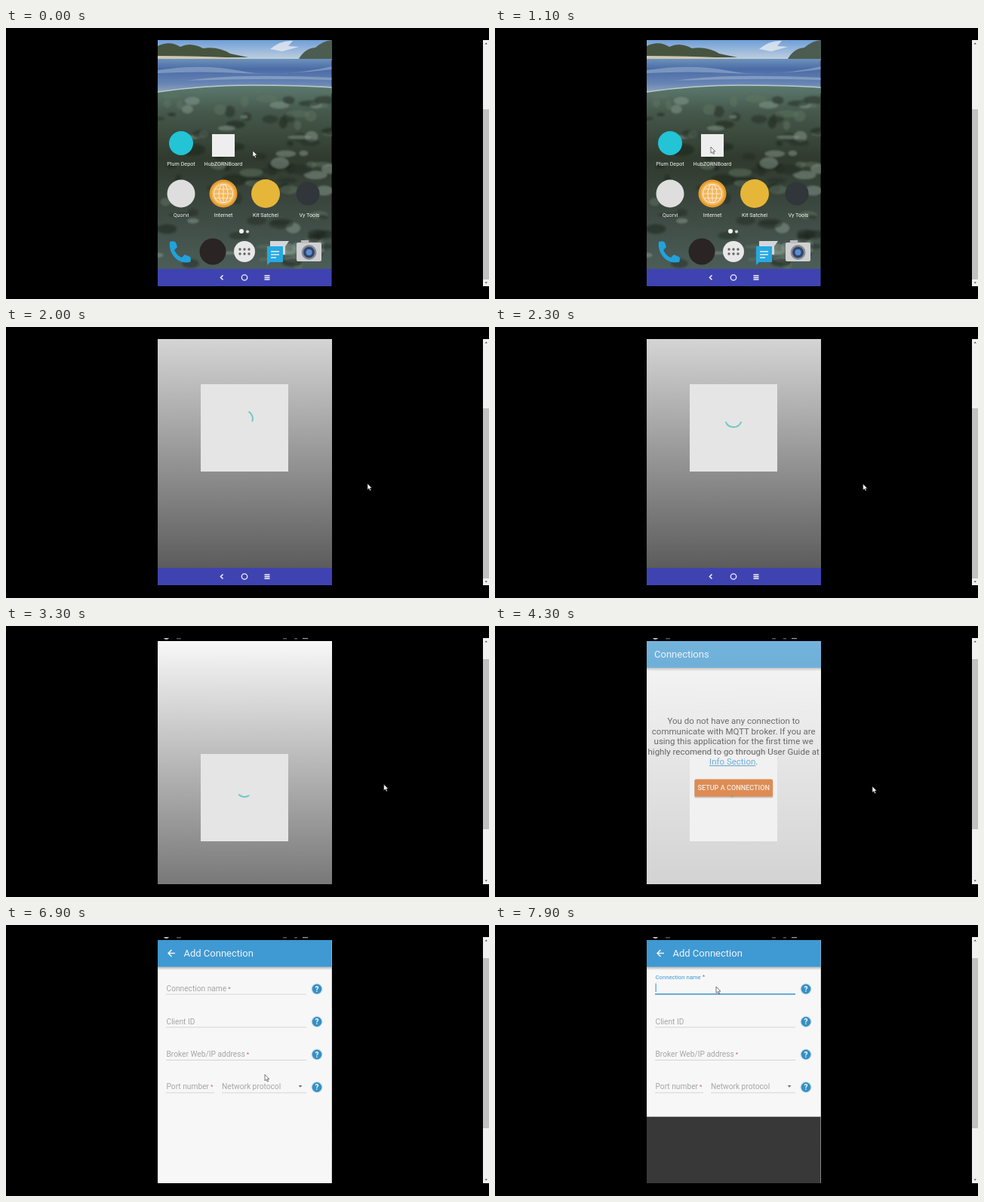
Write an HTML page that moves like this. It is 640x360 px and loops after 8 s.

```html
<!DOCTYPE html>
<html lang="en">
<head>
<meta charset="utf-8">
<title>Phone app setup</title>
<style>
  html, body { margin: 0; width: 100%; height: 100%; overflow: hidden; background: #000; }
  svg { display: block; width: 100vw; height: 100vh; font-family: Roboto, sans-serif; }
  .mid { text-anchor: middle; }
  .tag { font-size: 7.2px; fill: #f2f2f2; }
  .title { font-size: 13px; fill: #eef4f8; }
  .body { font-size: 11.5px; fill: #444; }
  .field { font-size: 10.2px; fill: #a6a6a6; }
  .star { font-size: 8px; fill: #b8686c; }
</style>
</head>
<body>
<svg id="stage" viewBox="0 0 640 360">
  <defs>
    <clipPath id="view"><rect x="201" y="16" width="230.5" height="327"/></clipPath>
    <clipPath id="reefClip"><rect x="201" y="86" width="231" height="234"/></clipPath>
    <linearGradient id="sky" x2="0" y2="1">
      <stop stop-color="#6f9fd8"/><stop offset="1" stop-color="#c4d2de"/>
    </linearGradient>
    <linearGradient id="sea" x2="0" y2="1">
      <stop stop-color="#6d92bc"/><stop offset=".3" stop-color="#4a6ba6"/>
      <stop offset=".7" stop-color="#6684b4"/><stop offset="1" stop-color="#94a9bc"/>
    </linearGradient>
    <linearGradient id="reef" x2="0" y2="1">
      <stop stop-color="#5c7a70"/><stop offset=".14" stop-color="#46594c"/>
      <stop offset=".4" stop-color="#303a2e"/><stop offset=".7" stop-color="#3d4a42"/>
      <stop offset="1" stop-color="#4c5d58"/>
    </linearGradient>
    <linearGradient id="dusk" x2="0" y2="1">
      <stop stop-color="#f8f8f8"/><stop offset="1" stop-color="#5c5c5c"/>
    </linearGradient>
    <linearGradient id="drop" x2="0" y2="1">
      <stop stop-color="#555" stop-opacity=".45"/><stop offset="1" stop-color="#555" stop-opacity="0"/>
    </linearGradient>
    <filter id="soft"><feGaussianBlur stdDeviation="1"/></filter>
  </defs>
  <rect width="640" height="360"/>

  <g clip-path="url(#view)">
    <g id="world">
      <g id="home"></g>
      <g id="splash">
        <rect x="201" y="-74" width="231" height="394" fill="url(#dusk)"/>
        <rect x="258" y="76" width="116" height="116" fill="#e5e5e5"/>
        <path id="spin" fill="none" stroke="#70c8c4" stroke-width="2"/>
      </g>
      <g fill="none" stroke="#f2f2f2" stroke-width="1.6">
        <rect x="201" y="320" width="231" height="23" fill="#3f43b2" stroke="none"/>
        <path d="M287.5 328.5l-3 3 3 3M342.5 329h7m-7 2.6h7m-7 2.6h7"/>
        <circle cx="316" cy="331.5" r="3.7" stroke-width="1.3"/>
      </g>
    </g>
    <g id="list"></g>
    <g id="form"></g>
    <g id="status">
      <rect x="201" y="16" width="231" height="4"/>
      <path d="M209 16h7q-1 2-3.500 2t-3.500-2z" fill="#c4c4c4"/>
      <path d="M226 16h6v1.500h-6zM367 16h5v1.500h-5zM382 16h4v1.500h-4z" fill="#555"/>
      <path d="M393 16h7v1.200h-7z" fill="#a0a0a0"/>
    </g>
  </g>

  <rect x="632" y="16" width="8" height="327" fill="#f1f1f1"/>
  <rect id="thumb" x="632" width="8" height="226" fill="#c1c1c1"/>
  <path d="M634.5 21.5l1.700-2 1.700 2zM634.500 337.500l1.700 2 1.700-2z" fill="#505050"/>
  <path id="cursor" d="M0 0v8.200l1.900-1.700 1.300 2.900 1.400-.6-1.300-2.800h2.500z" fill="#fff" stroke="#222" stroke-width=".6"/>
</svg>

<script>
const $ = id => document.getElementById(id);
const text = (x, y, s, cls, extra = "") => `<text x="${x}" y="${y}" class="${cls}" ${extra}>${s}</text>`;
const disc = (x, y, r, fill) => `<circle cx="${x}" cy="${y}" r="${r}" fill="${fill}"/>`;
const rect = (x, y, w, h, fill, extra = "") =>
  `<rect x="${x}" y="${y}" width="${w}" height="${h}" fill="${fill}" ${extra}/>`;
const path = (d, fill, extra = "") => `<path d="${d}" fill="${fill}" ${extra}/>`;

const PAPER = "#f7f7f7", BLUE = "#3f99d2", ORANGE = "#da6a1c";

function wallpaper() {
  let seed = 7;
  const rnd = () => (seed = seed * 16807 % 2147483647) / 2147483647;
  const tones = ["#8a9c90", "#1c241c", "#5f7460", "#252e26"];
  let blobs = "";
  for (let i = 0; i < 110; i++) {
    blobs += `<ellipse cx="${201 + rnd() * 231}" cy="${90 + rnd() * 230}" rx="${4 + rnd() * 13}"
      ry="${2 + rnd() * 6}" fill="${tones[i % 4]}" opacity=".5"/>`;
  }
  return rect(201, 16, 231, 27, "url(#sky)")
    + path("M350 28q14-12 30-11l-6 7 14 1-22 6z", "#e6ecf2", 'opacity=".8"')
    + path("M201 24q16-8 30 1 14-7 30 2 20-3 36 7l24 5H201z", "#46543f")
    + path("M201 37q60 0 130 4H201z", "#cfc6b0")
    + path("M388 41q8-14 22-15 10-9 22-10v25z", "#4d5c50")
    + rect(201, 41, 231, 46, "url(#sea)")
    + path("M201 56q60-9 110 1t121-6v4q-70 8-120 5t-111 0zM240 70q60-10 192-4v3q-100-3-192 1z", "#a8bcd6", 'opacity=".5"')
    + path("M201 85q60-9 125-9t106 3v241H201z", "url(#reef)")
    + `<g clip-path="url(#reefClip)"><g filter="url(#soft)">${blobs}</g></g>`
    + path("M201 85q60-9 125-9t106 3", "none", 'stroke="#bccbcc" stroke-width="1.5"');
}

function globe(x, y) {
  return disc(x, y, 18.5, "#e79b2c") + disc(x, y, 15.5, "#f2b65c")
    + `<g fill="none" stroke="#fae8c8" stroke-width="1.1"><circle cx="${x}" cy="${y}" r="12.5"/>
      <ellipse cx="${x}" cy="${y}" rx="6" ry="12.5"/>
      <path d="M${x} ${y - 12.5}v25M${x - 12.5} ${y}h25M${x - 11} ${y - 6}h22M${x - 11} ${y + 6}h22"/></g>`;
}

function homeScreen() {
  const tags = [[232, 183, "Plum Depot"], [288, 183, "HubZORNBoard"], [232, 250.5, "Quorvi"],
    [288, 250.5, "Internet"], [344, 250.5, "Kit Satchel"], [402, 250.5, "Vy Tools"]];
  let dots = "";
  for (let i = 0; i < 6; i++) dots += disc(310 + i % 3 * 6, 294 + (i > 2) * 6, 1.7, "#666");
  return wallpaper()
    + disc(232, 153, 16, "#22c4d6")
    + rect(273, 141, 30, 30, "#eee")
    + disc(232, 220, 18.5, "#dedede")
    + globe(288, 220)
    + disc(344, 220, 19, "#e6b638")
    + disc(400, 220, 15.5, "#30363a")
    + disc(312, 270, 3, "#f4f4f4") + disc(320, 270.5, 2, "#d4d8d8")
    + path("M217 284q6-2 8 1l2 6-4 4q4 8 10 10l4-4 7 3q2 3 0 7-17 3-25-13-3-7-2-14z", "#22a2dc")
    + disc(274, 297, 17.5, "#2a2424")
    + disc(316, 297, 14, "#e8e8e8") + dots
    + path("M350 283h25l-5 7v11h-20z", "#d2d8da")
    + path("M346 290h21v21h-17l-4 4z", "#26a8e2")
    + path("M351 297h11m-11 4h11m-11 4h7", "none", 'stroke="#e4f2fa" stroke-width="1.3"')
    + rect(385, 285, 33, 25, "#d0d0d2", 'rx="2"') + rect(391, 282, 10, 4, "#bcbcbe")
    + disc(401.5, 298, 10, "#868c94") + disc(401.5, 298, 7.5, "#344466") + disc(401.5, 298, 4, "#5a8ed8")
    + tags.map(([x, y, s]) => text(x, y, s, "tag mid")).join("");
}

const header = (x, s) => rect(201, 55, 231, 5, "url(#drop)") + rect(201, 20, 231, 35.5, BLUE)
  + text(x, 42, s, "title");

function listScreen() {
  const lines = ["You do not have any connection to", "communicate with MQTT broker. If you are",
    "using this application for the first time we", "highly recomend to go through User Guide at",
    `<tspan fill="${BLUE}" text-decoration="underline">Info Section</tspan>.`];
  return rect(201, 20, 231, 323, PAPER) + header(211, "Connections")
    + lines.map((s, i) => text(316.2, 130 + i * 13.5, s, "body mid")).join("")
    + rect(264, 205, 104.5, 23.5, "#777", 'rx="2" opacity=".45"')
    + rect(264.5, 203.5, 103.5, 23.2, ORANGE, 'rx="1.5"')
    + text(316.2, 218.4, "SETUP A CONNECTION", "mid", 'font-size="9.1" font-weight="500" fill="#fbeee4"');
}

function formScreen() {
  const star = `<tspan class="star" dx="2" dy="-1.5">*</tspan>`;
  const rule = (x, y, w) => rect(x, y, w, .8, "#ccc");
  const help = y => disc(412, y, 7.6, "#d0e0ea") + disc(412, y, 6.4, "#3590c4")
    + text(412, y + 3.5, "?", "mid", 'font-size="10" font-weight="700" fill="#f4f8fa"');
  return rect(201, 20, 231, 323, PAPER) + header(235.5, "Add Connection")
    + path("M224 37.5h-9m4.5-4.5l-4.5 4.5 4.5 4.5", "none", 'stroke="#eef4f8" stroke-width="1.5"')
    + `<text id="label" x="212.5">Connection name${star}</text>`
    + rule(212, 91.6, 186) + rect(212, 91, 186, 1.5, BLUE, 'id="focus"')
    + rect(212.6, 77.5, 1.1, 11.5, BLUE, 'id="caret"')
    + text(212.5, 131.5, "Client ID", "field") + rule(212, 135.5, 186)
    + text(212.5, 175, `Broker Web/IP address${star}`, "field") + rule(212, 179, 186)
    + text(212.5, 218.3, `Port number${star}`, "field") + rule(212, 222.5, 64)
    + text(286, 217.6, "Network protocol", "field") + rule(286, 222.5, 112)
    + path("M387.5 213h5l-2.5 2.8z", "#707070")
    + [85, 128.5, 172, 215.5].map(help).join("")
    + rect(201, 254.7, 231, 89, "#383838", 'id="dark"');
}

$("home").innerHTML = homeScreen();
$("list").innerHTML = listScreen();
$("form").innerHTML = formScreen();

const LOOP = 8000, STEP = 100;
const ramp = (t, a, b) => Math.min(1, Math.max(0, (t - a) / (b - a)));
const ease = u => u * u * (3 - 2 * u);
const mix = (a, b, u) => a + (b - a) * u;
const set = (id, attrs) => { for (const k in attrs) $(id).setAttribute(k, attrs[k]); };
const show = (id, on) => set(id, { visibility: on ? "visible" : "hidden" });

// time, x, y of the pointer tip
const track = [[0, 327, 163], [900, 286, 158], [1400, 286, 158], [2000, 479, 208],
  [2700, 501, 209], [4300, 500, 213], [4600, 500, 213], [5600, 349, 209],
  [5800, 347, 208], [6800, 347, 208], [7400, 293, 82], [LOOP, 293, 82]];

function pointer(t) {
  const i = track.findIndex(k => k[0] > t);
  const [a, x0, y0] = track[i - 1], [b, x1, y1] = track[i];
  const u = ease(ramp(t, a, b));
  return [mix(x0, x1, u), mix(y0, y1, u)];
}

function arc(t) {
  const mid = -20 + (t - 2000) * 475 / 1300;
  const half = 40 + 30 * Math.sin((t - 2000) * 2 * Math.PI / 1300);
  const at = deg => {
    const r = deg * Math.PI / 180;
    return `${316 + 11 * Math.cos(r)} ${122 + 11 * Math.sin(r)}`;
  };
  return `M${at(mid - half)}A11 11 0 0 1 ${at(mid + half)}`;
}

function render(t) {
  const scroll = ease(ramp(t, 2700, 3000));
  set("world", { transform: `translate(0 ${94 * scroll})` });
  set("thumb", { y: mix(108, 44, scroll) });
  show("status", scroll === 1);

  const open = ease(ramp(t, 1500, 1800));
  set("splash", { opacity: open, transform: `translate(0 ${30 * (1 - open)})` });
  set("spin", { d: arc(t) });

  set("list", { opacity: ramp(t, 4000, 4417) });

  const enter = ease(ramp(t, 6500, 6900));
  set("form", { opacity: enter, transform: `translate(0 ${30 * (1 - enter)})` });
  const focus = ease(ramp(t, 7400, 7700));
  set("label", {
    y: mix(88, 72, focus), "font-size": mix(10.2, 7.7, focus), fill: focus > 0 ? BLUE : "#a6a6a6"
  });
  set("focus", { x: mix(305, 212, focus), width: 186 * focus });
  show("caret", t >= 7500);
  show("dark", t >= 7800);

  set("cursor", { transform: `translate(${pointer(t)})` });
}

function frame(now) {
  render(Math.floor(now % LOOP / STEP) * STEP);
  requestAnimationFrame(frame);
}
render(0);
requestAnimationFrame(frame);
</script>
</body>
</html>
```
